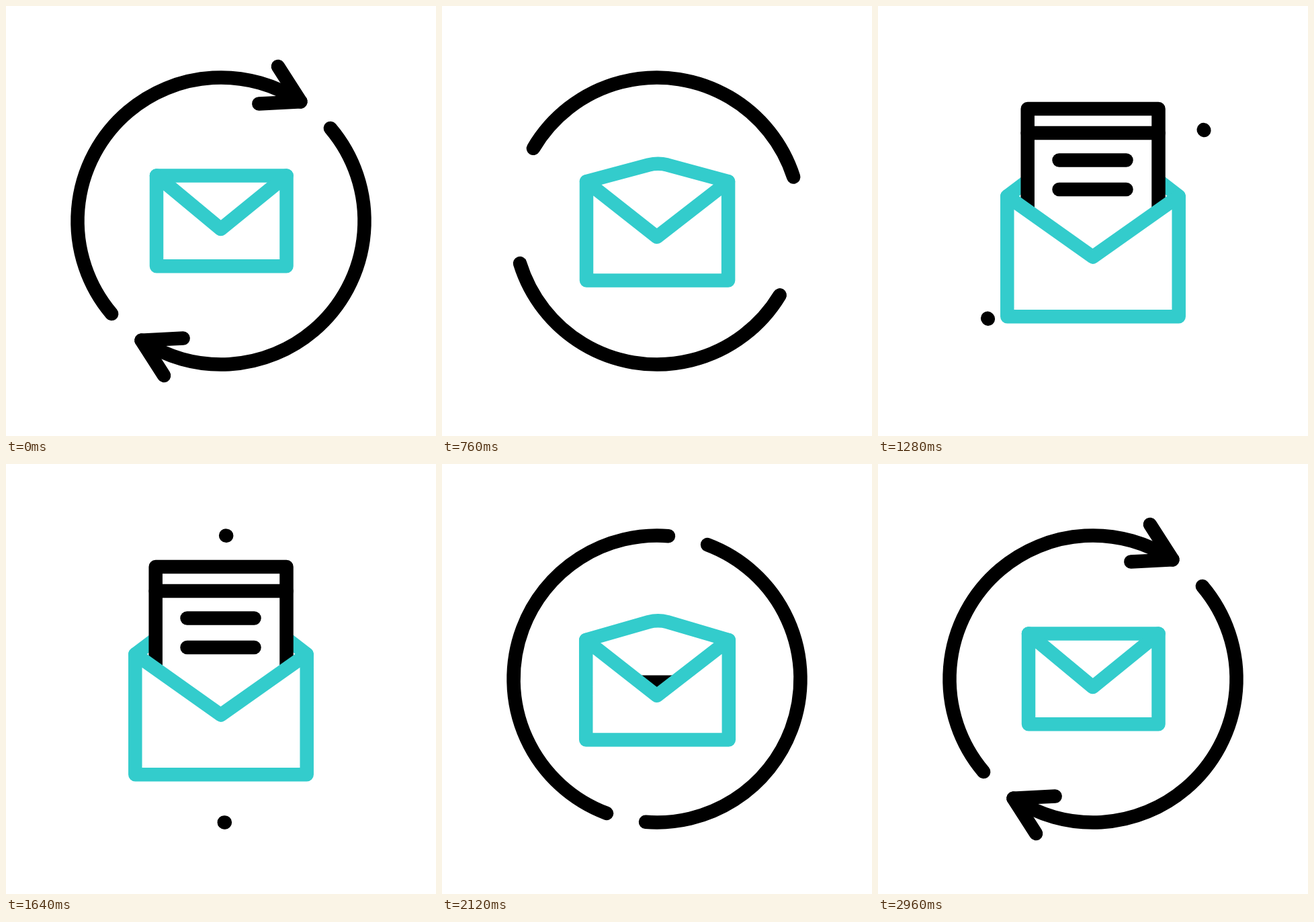
Animation of 640 by 640 pixels, one loop 3000 ms. Source, as an HTML page with a canvas:

```html
<!DOCTYPE html>
<html lang="en">
<head>
<meta charset="utf-8">
<title>Mail exchange</title>
<style>
  html, body { margin: 0; width: 100%; height: 100%; overflow: hidden; background: #fff; }
  canvas { display: block; width: 100vw; height: 100vh; }
</style>
</head>
<body>
<canvas id="stage" width="640" height="640"></canvas>
<script>
const ctx = document.getElementById('stage').getContext('2d');
const LOOP = 3000, STEP = 40;
const RADIUS = 213.5, TAIL = 139.7, FULL = 164;
const TEAL = '#33cccc', BLACK = '#000', WHITE = '#fff';
const rad = deg => deg * Math.PI / 180;

// Sine ease from 0 to 1 between two times
function ease(t, from, to) {
  const x = Math.min(1, Math.max(0, (t - from) / (to - from)));
  return (1 - Math.cos(Math.PI * x)) / 2;
}

// The arcs swing forward, far back, slightly forward, then settle
const swing = t => 77.5 * ease(t, 120, 580) - 137.5 * ease(t, 580, 1845)
  + 98 * ease(t, 1845, 2570) - 38 * ease(t, 2570, 2960);

// Arc length in degrees: shrinks slowly, then to a dot, and grows again
const span = t => FULL - 38.5 * ease(t, 200, 960) - 125.2 * ease(t, 960, 1240)
  + 163.7 * ease(t, 1700, 1990);

const openness = t => ease(t, 470, 1280) - ease(t, 1720, 2360);

// How far a part of the letter is still tucked into the envelope, 1 to 0
const tucked = (t, sinkAt) => 1 - ease(t, 515, 1280) + ease(t, sinkAt, 2360);

function stroke(color, points, closed) {
  ctx.beginPath();
  points.forEach(p => ctx.lineTo(...p));
  if (closed) {
    ctx.closePath();
    ctx.fillStyle = WHITE;
    ctx.fill();
  }
  ctx.strokeStyle = color;
  ctx.stroke();
}

function drawArrow(tail, length, withHead) {
  ctx.save();
  ctx.translate(320, 320);
  ctx.beginPath();
  ctx.arc(0, 0, RADIUS, rad(tail), rad(tail + length));
  ctx.strokeStyle = BLACK;
  ctx.stroke();
  if (withHead) {
    ctx.rotate(rad(tail + length));
    ctx.translate(RADIUS, 0);
    stroke(BLACK, [[25, -57], [0, 0], [-37, -50]]);
  }
  ctx.restore();
}

function drawLetter(t, left, right, bottom) {
  const top = 153 + 287 * tucked(t, 1811);
  const header = 189 + 235 * tucked(t, 1771);
  const line = 229.5 + 192 * tucked(t, 1748);
  const corner = 417.5 - 17 * tucked(t, 1811);
  ctx.save();
  ctx.beginPath();
  ctx.rect(left, 0, right - left, bottom);
  ctx.clip();
  stroke(BLACK, [[222.7, 480], [222.7, header], [222.7, top],
    [corner, top], [417.5, header], [417.5, 480]], true);
  stroke(BLACK, [[222.7, header], [417.5, header]]);
  for (const y of [line, line + 43.6]) stroke(BLACK, [[269.5, y], [369.5, y]]);
  ctx.restore();
}

function drawEnvelope(t) {
  const p = openness(t);
  const left = 224 - 31.7 * p, right = 417.5 + 30.2 * p;
  const top = 252.5 + 30.7 * p, bottom = 387.3 + 75 * p;
  const fold = 332 + 41.5 * p, peak = 252.5 - 68 * p;

  // Back flap with a softened tip
  const tip = 321.5, soft = 14, rise = soft * (top - peak) / 117;
  ctx.beginPath();
  ctx.moveTo(left, top);
  ctx.lineTo(tip - soft, peak + rise);
  ctx.quadraticCurveTo(tip, peak, tip + soft, peak + rise);
  ctx.lineTo(right, top);
  ctx.strokeStyle = TEAL;
  ctx.stroke();

  if (p > 0) drawLetter(t, left, right, bottom);
  stroke(TEAL, [[left, top], [left, bottom], [right, bottom], [right, top], [319.7, fold]], true);
}

function draw(t) {
  ctx.fillStyle = WHITE;
  ctx.fillRect(0, 0, 640, 640);
  ctx.lineWidth = 20.5;
  ctx.lineCap = ctx.lineJoin = 'round';
  const tail = TAIL + swing(t), length = span(t);
  const lead = 3.5 * (1 - length / FULL);
  const withHead = t < 760 || t >= 2360;
  drawArrow(tail, length, withHead);
  drawArrow(tail + 180 + lead, length, withHead);
  drawEnvelope(t);
}

const start = performance.now();
function tick() {
  const t = (performance.now() - start) % LOOP;
  draw(Math.floor(t / STEP) * STEP);
  requestAnimationFrame(tick);
}
tick();
</script>
</body>
</html>
```
